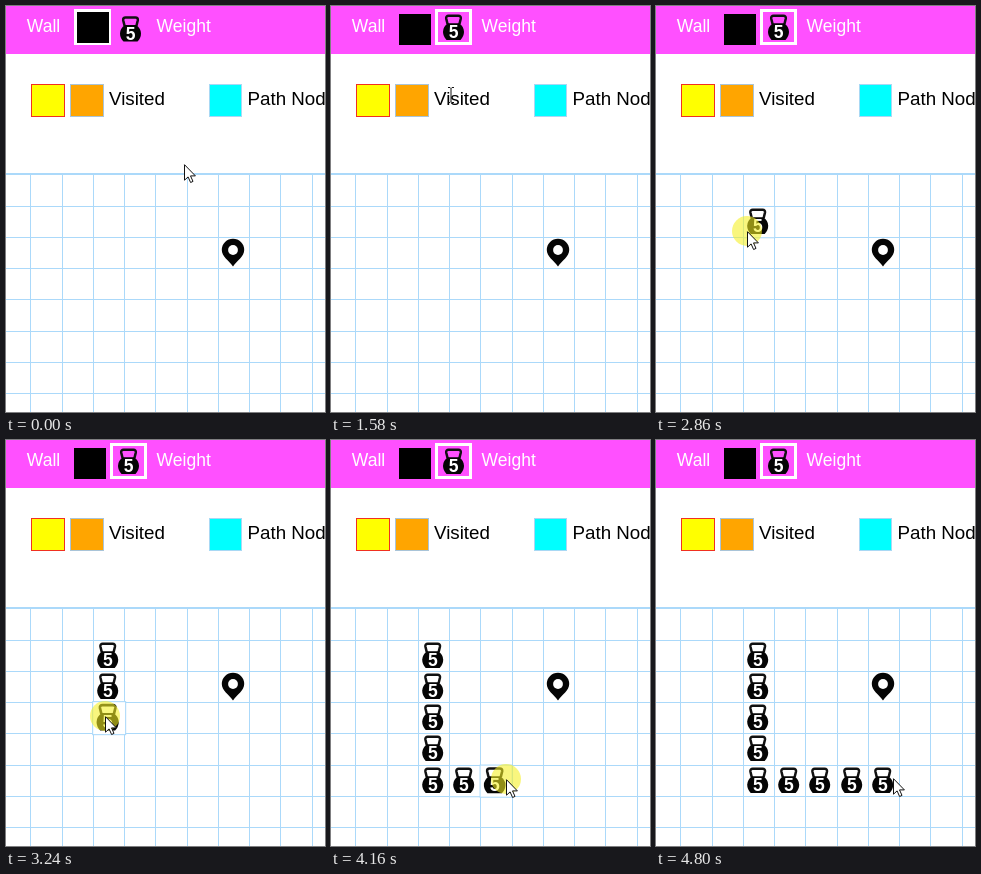
An HTML page that plays this animation: 319x406 px, repeating every 4.9 s.

```html
<!DOCTYPE html>
<html lang="en">
<head>
<meta charset="utf-8">
<title>Placing weights on a grid</title>
<style>
  html, body { margin: 0; width: 100%; height: 100%; overflow: hidden; background: #fff; }
  svg { display: block; width: 319px; height: 406px; }
  text { font-family: "Liberation Sans", Arial, sans-serif; }
  .menu { font-size: 17.5px; fill: #fff; }
  .legend { font-size: 18.75px; }
  .line { fill: #abd9fa; }
  .five { font-size: 17.5px; font-weight: bold; fill: #fff; text-anchor: middle; }
</style>
</head>
<body>
<svg viewBox="0 0 319 406">
  <defs>
    <g id="bell">
      <path d="M4.6 10 3.2 4.2Q2.9 1.5 5.6 1.5H15.4Q18.1 1.5 17.8 4.2L16.4 10" fill="none" stroke="#111" stroke-width="2.5"/>
      <path d="M5 9H16Q21 12.5 21 17.5 21 22 17.5 25.6H3.5Q0 22 0 17.5 0 12.5 5 9Z" fill="#050505"/>
      <text class="five" x="10.6" y="23.6">5</text>
    </g>
  </defs>

  <rect width="319" height="48" fill="#ff50ff"/>
  <text class="menu" x="20.8" y="26">Wall</text>
  <text class="menu" x="150.6" y="26">Weight</text>
  <rect id="frame" y="3" width="37" height="36" fill="#fff"/>
  <rect id="wall" width="32" height="31"/>
  <rect id="slot" x="107" y="6" width="31" height="30" fill="#ff50ff"/>
  <use id="tool" href="#bell"/>

  <rect x="25.5" y="78.5" width="33" height="32" fill="#ff0" stroke="#f03020"/>
  <rect x="64.5" y="78.5" width="33" height="32" fill="#ffa500" stroke="#a9c4d8"/>
  <rect x="203.5" y="78.5" width="32" height="32" fill="#0ff" stroke="#a8d8f4"/>
  <text class="legend" x="103" y="99">Visited</text>
  <text class="legend" x="241.5" y="99">Path Node</text>

  <g id="grid" shape-rendering="crispEdges"></g>
  <path d="M227 260.5C222.8 254.5 215.8 250.5 215.8 244A11.2 11.2 0 0 1 238.2 244C238.2 250.5 231.2 254.5 227 260.5Z" fill="#050505"/>
  <circle cx="227" cy="244" r="4.9" fill="#fff"/>
  <g id="weights"></g>

  <g id="pointer">
    <circle id="halo" r="15" fill="#f4f020" opacity=".58"/>
    <path id="arrow" d="M.5 .7V16.2L4.1 12.9 6.6 18.5 9 17.4 6.5 11.9H11.4Z" fill="#fff" stroke="#111"/>
    <path id="beam" d="M-3 -7.5H-1L0 -6.5 1 -7.5H3M0 -6.5V6.5M-3 7.5H-1L0 6.5 1 7.5H3" fill="none" stroke="#111"/>
  </g>
</svg>
<script>
const $ = id => document.getElementById(id);
const CELL = 31.25, LEFT = 24.9, TOP = 168.75;
const LOOP = 4900, STEP = LOOP / 53, POP = 300;
const PICK = 1010, PICKED = 1195, PRESS = 2575, RELEASE = 4790;

// Key points of the pointer's path: ms, x, y.
const path = [
  [0, 178, 158], [540, 138, 42], [920, 131, 26], [1480, 131, 26],
  [1570, 120, 89], [2040, 97, 167], [2400, 90, 213], [2680, 90, 213],
  [2860, 91, 224], [3360, 102, 293], [3530, 108, 325], [3600, 109, 328],
  [3960, 122, 338], [4160, 175, 339], [4480, 213, 338], [4720, 237, 338],
  [LOOP, 238, 338]
];

const mix = (a, b, p) => a + (b - a) * p;
const easeOut = p => 1 - (1 - p) ** 1.8;
const column = x => Math.floor((x - LEFT) / CELL);
const row = y => Math.floor((y - TOP) / CELL);
const lineX = i => Math.floor(LEFT + i * CELL);
const lineY = j => Math.floor(TOP + j * CELL);

function pointerAt(time) {
  const i = Math.max(1, path.findIndex(p => p[0] >= time));
  const [t0, x0, y0] = path[i - 1], [t1, x1, y1] = path[i];
  const p = (time - t0) / (t1 - t0);
  return [mix(x0, x1, p), mix(y0, y1, p)];
}

// Every cell the pressed pointer enters gets a weight.
function findWeights() {
  const seen = new Map();
  for (let t = PRESS; t < RELEASE; t += 5) {
    const [x, y] = pointerAt(t);
    const col = column(x), line = row(y), key = `${col},${line}`;
    if (!seen.has(key)) seen.set(key, { col, line, at: t });
  }
  return [...seen.values()];
}

// Grows from 0.3 to 1.2, then settles at 1.
function popScale(age) {
  const p = Math.min(age / POP, 1) * 2;
  return p < 1 ? mix(.3, 1.2, easeOut(p)) : mix(1.2, 1, easeOut(p - 1));
}

function drawGrid() {
  const bar = (x, y, w, h) => `<rect class="line" x="${x}" y="${y}" width="${w}" height="${h}"/>`;
  let out = bar(0, 167, 319, 2);
  for (let i = 0; i < 10; i++) out += bar(lineX(i), 168, 1, 238);
  for (let j = 1; j < 8; j++) out += bar(0, lineY(j), 319, 1);
  $('grid').innerHTML = out;
}

function drawWeights() {
  $('weights').innerHTML = weights.map(() => `<g>
    <rect x=".5" y=".5" width="${CELL}" height="${CELL}" fill="#fff" stroke="#abd9fa"/>
    <use href="#bell" x="4.2" y="2.3"/></g>`).join('');
}

const place = (el, x, y) => el.setAttribute('transform', `translate(${x} ${y})`);
const show = (el, on) => el.setAttribute('display', on ? 'inline' : 'none');

function render(time) {
  // The picture advances in even steps, each shown a touch early.
  const now = Math.floor((time + 15) / STEP) % 53 * STEP;

  const picked = now >= PICKED;
  $('frame').setAttribute('x', picked ? 104 : 68);
  place($('wall'), picked ? 68 : 71, picked ? 8 : 6);
  show($('slot'), picked);
  place($('tool'), picked ? 112 : 114, picked ? 8.3 : 10);

  weights.forEach(({ col, line, at }, i) => {
    const cell = $('weights').children[i], age = now - at, half = CELL / 2;
    show(cell, age >= 0);
    if (age < 0) return;
    show(cell.firstElementChild, age < POP);
    cell.setAttribute('transform',
      `translate(${lineX(col) + half} ${lineY(line) + half})` +
      `scale(${popScale(age)})translate(${-half} ${-half})`);
  });

  const [x, y] = pointerAt(now).map(Math.round);
  const overText = x > 103 && x < 159 && y > 82 && y < 104;
  place($('pointer'), x, y);
  show($('halo'), (now >= PICK && !picked) || (now >= PRESS && now < RELEASE));
  show($('beam'), overText);
  show($('arrow'), !overText);
}

const weights = findWeights();
drawGrid();
drawWeights();
const began = performance.now();
function tick() {
  render((performance.now() - began) % LOOP);
  requestAnimationFrame(tick);
}
tick();
</script>
</body>
</html>
```
